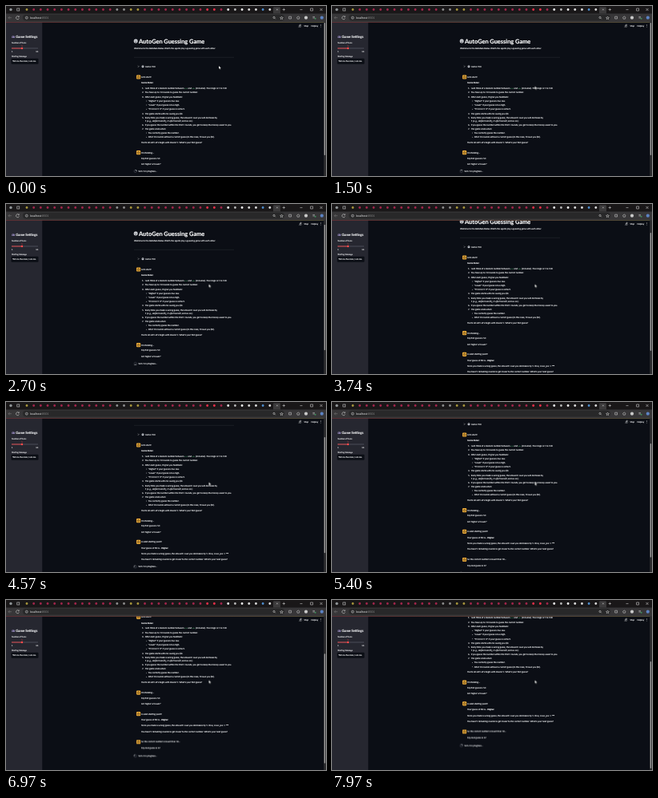
These frames come from a looping animation (400x213 px, 8 s). An HTML page:

```html
<!DOCTYPE html>
<html lang="en">
<head>
<meta charset="utf-8">
<title>Guessing game</title>
<style>
html, body { margin: 0; width: 100%; height: 100%; overflow: hidden; background: #0b0e15; }
svg { display: block; width: 100vw; height: 100vh; }
text {
  font: 2.75px Lato, "Open Sans", sans-serif; fill: #f0f1f3; stroke: #f0f1f3; stroke-width: .1;
  text-rendering: geometricPrecision; white-space: pre;
}
.bold { font-weight: 700; }
.title { font-size: 7.4px; font-weight: 700; fill: #fff; stroke-width: .2; }
.heading { font-size: 4.25px; font-weight: 700; }
.intro { font-size: 2.62px; }
.small { font-size: 2.5px; }
.accent { font-size: 2.5px; fill: #ff4b4b; stroke: none; }
.url { font-size: 3.6px; stroke: none; }
.code { font-family: "DejaVu Sans Mono", monospace; font-size: 2.1px; fill: #58bd78; stroke: none; }
.math { font-family: "Liberation Serif", serif; font-style: italic; font-size: 3.1px; }
.line { fill: none; stroke: #c9c9c9; stroke-width: .6; }

#feed { animation: scroll 8s linear infinite; }
#thumb { animation: thumb 8s linear infinite; }
#pointer { animation: point 8s ease-in-out infinite; }
#first-wait { animation: until-reply 8s step-end infinite; }
#reply { animation: from-reply 8s step-end infinite; }
#second-wait { animation: between 8s step-end infinite; }
#guess { animation: from-guess 8s step-end infinite; }
.spin { transform-box: fill-box; transform-origin: center; animation: spin .8s linear infinite; }
.run { animation: run .8s ease-in-out infinite alternate; }

@keyframes scroll {
  0%, 27.5% { transform: translateY(0); }
  33.75% { transform: translateY(-7px); }
  46.75% { transform: translateY(-22px); }
  67.5% { transform: translateY(-48px); }
  78.75% { transform: translateY(-59px); }
  99.6%, 100% { transform: translateY(-80.5px); }
}
@keyframes thumb {
  0%, 27.5% { y: 21px; height: 166px; }
  39% { y: 30px; height: 150px; }
  99.6%, 100% { y: 77px; height: 134px; }
}
@keyframes point {
  0%, 6% { transform: translate(266px, 75px); }
  15%, 100% { transform: translate(253.5px, 100.5px); }
}
@keyframes until-reply { 0% { opacity: 1; } 39%, 100% { opacity: 0; } }
@keyframes from-reply { 0% { opacity: 0; } 39%, 100% { opacity: 1; } }
@keyframes between { 0% { opacity: 0; } 39% { opacity: 1; } 57.5%, 100% { opacity: 0; } }
@keyframes from-guess { 0% { opacity: 0; } 57.5%, 100% { opacity: 1; } }
@keyframes spin { to { transform: rotate(360deg); } }
@keyframes run { from { transform: translateX(-.6px); } to { transform: translateX(.4px); } }
</style>
</head>
<body>
<svg viewBox="0 0 400 213" preserveAspectRatio="none">
  <defs>
    <clipPath id="page"><rect x="45.3" y="20" width="352" height="193"/></clipPath>
    <linearGradient id="stripe"><stop stop-color="#8a3034"/><stop offset="1" stop-color="#7d7445"/></linearGradient>
    <g id="bot">
      <rect x="-2.6" y="-2.6" width="5.2" height="5.2" rx="1.1" fill="#f5b23c"/>
      <path d="M-1.4-.8h2.8v2h-2.8zM0-.8v-.9" fill="none" stroke="#3a2a10" stroke-width=".5"/>
      <path d="M-.7 0v.5M.7 0v.5" stroke="#3a2a10" stroke-width=".5"/>
    </g>
  </defs>

  <rect width="400" height="213" fill="#0b0e15"/>
  <g clip-path="url(#page)"><g id="feed"></g></g>

  <rect y="20" width="45.3" height="193" fill="#262730"/>
  <g id="sidebar"></g>
  <g id="toolbar">
    <g class="run" fill="none" stroke="#dcdde0" stroke-width=".6">
      <circle cx="368.4" cy="23.5" r=".5"/>
      <path d="M366.5 25l1.7-.7 1.4 1M368.2 24.4l-.5 1.4 1.1 1M367.7 25.8l-1.3.8"/>
    </g>
    <g fill="#e8e9ec">
      <circle cx="393.6" cy="23.3" r=".4"/><circle cx="393.6" cy="24.7" r=".4"/><circle cx="393.6" cy="26.1" r=".4"/>
    </g>
  </g>
  <rect x="397.2" y="20" width="2.8" height="193" fill="#2c2c2e"/>
  <rect id="thumb" x="397.7" y="21" width="1.4" height="166" rx=".7" fill="#a0a0a0"/>

  <rect width="400" height="10" fill="#191718"/>
  <rect y="9.5" width="400" height="11" fill="#373638"/>
  <path d="M334 9.5V2.5q0-1.3 1.3-1.3h6.4q1.3 0 1.3 1.3V9.5z" fill="#3b3a3b"/>
  <rect x="21" y="10.8" width="327" height="7.6" rx="3.8" fill="#282829"/>
  <rect y="20.4" width="397.2" height=".5" fill="url(#stripe)"/>
  <g id="tabs"></g>
  <g class="line">
    <path d="M7 14.7H3M4.7 13L3 14.7l1.7 1.7" stroke="#777"/>
    <path d="M16 13.4a2 2 0 1 0 .4 2M16.3 12.4v1.4h-1.4"/>
    <circle cx="25.8" cy="14.7" r="1.5"/><path d="M25.8 14.5v1"/>
    <path d="M345.6 4.5h3.4M347.3 2.8v3.4M367.5 4.6h3M380.6 3h3v3h-3zM392.5 3l3 3M395.5 3l-3 3"/>
    <circle cx="335" cy="14.4" r="1.1"/><path d="M335.8 15.2l1.1 1.1"/>
    <path d="M344.5 13.2l.6 1.1 1.3.2-1 .9.3 1.3-1.2-.7-1.2.7.3-1.3-1-.9 1.3-.2z"/>
    <path d="M353.7 13.2h2.8V16h-2.8zM363.6 14.2l1.7-1.2 1.7 1.2-.6 2h-2.2z"/>
    <path d="M383.4 13.6h2.6M383.4 15h2.6"/>
  </g>
  <circle cx="375" cy="14.7" r="2.1" fill="#c9c9c9"/>
  <circle cx="386.6" cy="15.8" r="1" fill="#3e8f59"/>
  <circle cx="394.8" cy="14.7" r="2.1" fill="#5c83c4"/>

  <path id="pointer" d="M0 0v4l1-.9.7 1.5.7-.3-.7-1.5h1.3z" fill="#fff" stroke="#111" stroke-width=".25"/>
</svg>
<script>
const fill = (id, parts) => document.getElementById(id).insertAdjacentHTML("beforeend", parts.join(""));
const label = (x, y, words, kind = "") => `<text x="${x}" y="${y + .9}" class="${kind}">${words}</text>`;
const part = (kind, words) => `<tspan class="${kind}">${words}</tspan>`;
const bot = y => `<use href="#bot" x="165.6" y="${y}"/>`;
const said = (y, words, kind) => label(169, y, words, kind);
const item = (y, n, words) => label(170, y, n + ".") + label(173.7, y, words);
const bullet = (y, words) => `<circle cx="175.4" cy="${y}" r=".45" fill="#e8e9ec"/>` + label(177.8, y, words);
const group = (id, ...parts) => `<g id="${id}">${parts.join("")}</g>`;
const waiting = (y, turn) =>
  `<g class="spin" fill="none" stroke-width=".55"><circle cx="161.7" cy="${y}" r="1.6" stroke="#555963"/>` +
  `<path d="M161.7 ${y - 1.6}a1.6 1.6 0 0 1 1.6 1.6" stroke="#eee"/></g>` +
  label(165.2, y, `Turn ${turn} in progress...`);

fill("feed", [
  `<rect x="159.8" y="41.6" width="4.8" height="4.8" rx="1.9" fill="#d6d8dd"/>
   <path d="M161.2 43.2v1M163.2 43.2v1M161 45.2h2.4" stroke="#272a33" stroke-width=".6"/>`,
  label(166, 45.7, "AutoGen Guessing Game", "title"),
  label(160, 53.5, `Welcome to the ${part("bold", "AutoGen Game")}. Watch the agents play a guessing game with each other.`, "intro"),
  `<path d="M160 64.3h125" stroke="#2c2f37" stroke-width=".5"/>`,
  `<path d="M165 74.7l1 1-1 1" class="line"/>`,
  `<circle cx="171" cy="75.7" r="1.5" fill="#c9ccd3"/><path d="M170.2 75.5h1.6" stroke="#30343d" stroke-width=".5"/>`,
  label(174, 75.7, "Game 590"),

  bot(89), said(89, "Let's start!"),
  said(96.3, "Game Rules:", "bold"),
  item(102.8, 1, `I will think of a random number between ${part("code", "min")} and ${part("code", "max")} (inclusive). The range is 1 to 100`),
  item(108.3, 2, "You have up to 10 rounds to guess the correct number."),
  item(113.7, 3, "After each guess, I'll give you feedback:"),
  bullet(119, `"Higher" if your guess is too low.`),
  bullet(124, `"Lower" if your guess is too high.`),
  bullet(129.2, `"YOU GOT IT" if your guess is correct.`),
  item(134.6, 4, "The game starts with me owing you $0."),
  item(139.7, 5, "Every time you make a wrong guess, the amount I owe you will decrease by"),
  label(173.7, 143.8, `1 ${part("math", "(e.g., 4afterround1), 3")} ${part("math", "afterround2")}, and so on.)`),
  item(149, 6, "If you guess the number within the first 5 rounds, you get to keep the money owed to you."),
  item(154, 7, "The game ends when:"),
  bullet(159, "You correctly guess the number."),
  bullet(164.2, "After 10 rounds without a correct guess (in this case, I'll owe you $0)."),
  said(171, "You're all set! Let's begin with Round 1. What's your first guess?"),

  bot(183.7), said(183.7, "I'm thinking..."),
  said(190.6, "My first guess is 50"),
  said(198, "Is it higher or lower?"),
  group("first-wait", waiting(207, 1)),

  group("reply",
    bot(210.3), said(210.3, "A solid starting point!"),
    said(217.8, `Your guess of ${part("bold", "50")} is... ${part("bold", "Higher.")}`),
    said(225.2, `Since you made a wrong guess, the amount I owe you decreases by 1. ${part("math", "Now, Iowe you = **")}`),
    said(232.6, "You have 9 remaining rounds to get closer to the correct number. What's your next guess?")),
  group("second-wait", waiting(241.5, 1)),

  group("guess",
    bot(245.5), said(245.5, "So the correct number is lower than 50..."),
    said(252.9, "My next guess is 37"),
    waiting(263, 2))
]);

fill("sidebar", [
  `<rect x="7" y="37.5" width="4" height="2.6" rx="1.2" fill="#8b7fb0"/><path d="M8.2 38.1v1.4M7.5 38.8h1.4" stroke="#222" stroke-width=".4"/>`,
  label(12.2, 39.2, "Game Settings", "heading"),
  label(7, 46, "Number of Turns", "small"),
  `<path d="M7 53h33" stroke="#555762" stroke-width=".8"/><path d="M7 53h13" stroke="#ff4b4b" stroke-width=".8"/>`,
  `<circle cx="20" cy="53" r="1.2" fill="#ff4b4b"/>`,
  label(19.3, 50, "5", "accent"),
  label(7, 57, "1", "small"), label(37.3, 57, "10", "small"),
  label(7, 63, "Starting Message", "small"),
  `<rect x="6.5" y="65.8" width="34" height="7" rx="1" fill="#0b0e15"/>`,
  label(8.3, 69.3, "Tell me the rules, I am rea", "intro")
]);

fill("toolbar", [label(372.5, 24.7, "Stop"), label(381.5, 24.7, "Deploy")]);

// Plain marks for the open tabs; the rest share one red.
const tabColours = {
  0: "#a8963c", 13: "#8f8f8f", 14: "#8f8f8f", 15: "#a8963c", 16: "#a8963c", 26: "#f0304a", 27: "#f0304a",
  29: "#eee", 30: "#bbb", 31: "#eee", 32: "#ddd", 33: "#ddd", 34: "#4f8fd0", 35: "#ddd"
};
fill("tabs", [
  `<circle cx="6" cy="4.5" r="1.7" fill="#909598"/><rect x="13.8" y="3" width="3" height="3" fill="none" stroke="#ccc" stroke-width=".6"/>`,
  ...Array.from({ length: 36 }, (_, i) =>
    `<circle cx="${26 + i * 8.68}" cy="4.5" r="1.4" fill="${tabColours[i] || "#a3264c"}"/>`),
  `<path d="M338 3.6l1.8 1.8M339.8 3.6l-1.8 1.8" class="line"/>`,
  label(30, 14.8, `localhost<tspan fill="#929292">:8501</tspan>`, "url")
]);
</script>
</body>
</html>
```
